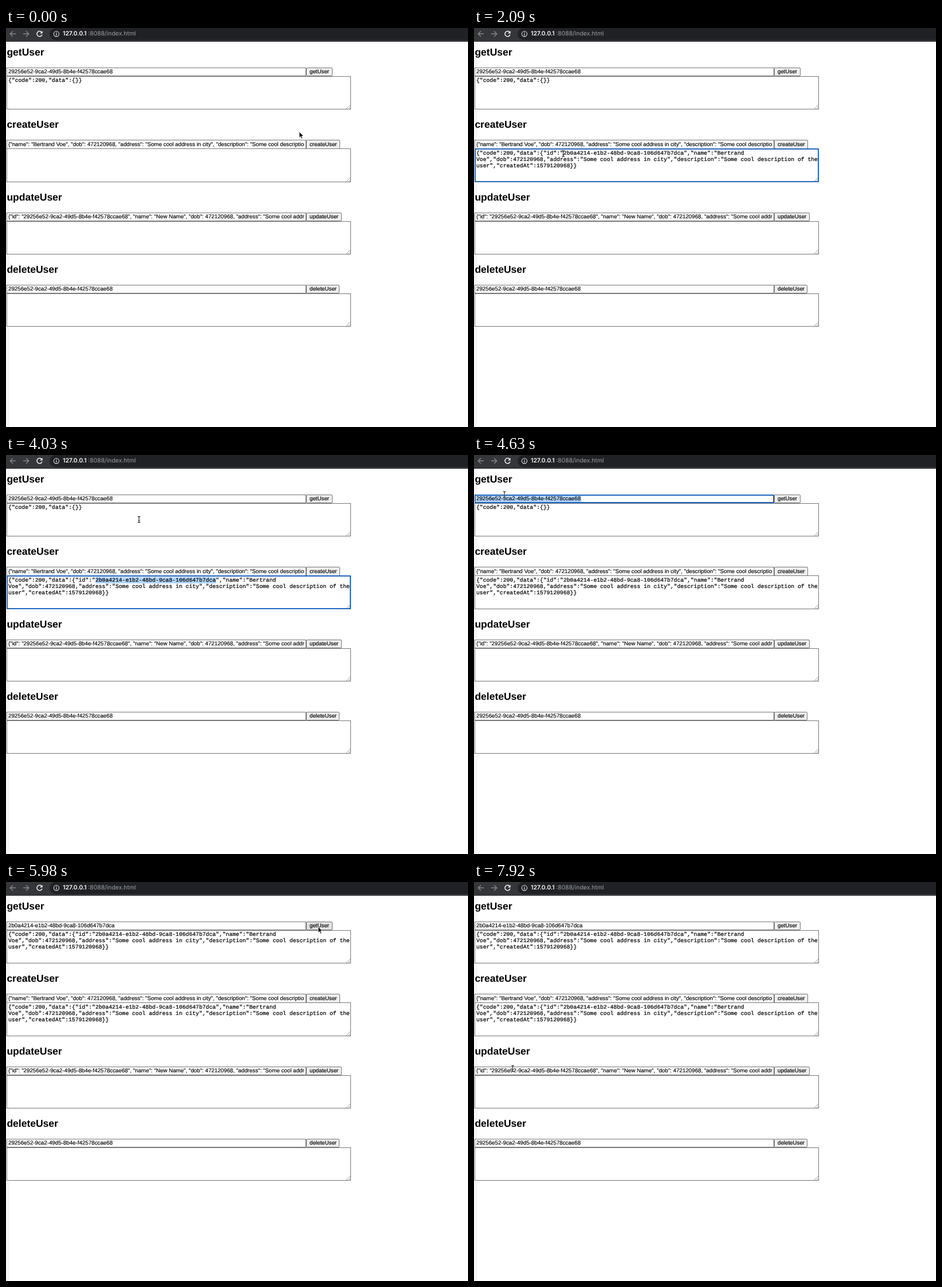
An HTML page for the animation above (8000 ms loop, 805x696 px).

```html
<!DOCTYPE html>
<html lang="en">
<head>
<meta charset="utf-8">
<title>User API</title>
<style>
  html, body { margin: 0; width: 100%; height: 100%; overflow: hidden; background: #fff; }
  body { position: relative; color: #000; text-rendering: geometricPrecision; }
  body *, .page::before, .area::after { position: absolute; box-sizing: border-box; margin: 0; white-space: pre; }

  /* browser bar */
  .bar { left: 0; top: 0; width: 100%; height: 24px; background: #35363a; overflow: hidden; }
  .omni { left: 76px; top: 0; width: 760px; height: 20.5px; border-radius: 10.5px; background: #202124; }
  .bar svg { left: 0; top: 0; }
  .url { top: 2px; font: 10.4px/16px Inter, Roboto, sans-serif; color: #9aa0a6; }
  .host { color: #fff; font-weight: 600; }

  /* form */
  .page { left: 0; top: 0; width: 805px; height: 696px; }
  .page::before { content: ""; left: 0; top: 24px; width: 6px; bottom: 0; background: #f6f6f6; }
  section { left: 0; top: calc(var(--i) * 126.4px); width: 805px; height: 150px; }
  h2 { left: 1.4px; top: 32px; font: bold 17.5px/20px "Liberation Sans", Arial, sans-serif; }
  .field, .btn, .area { border: 1px solid #767676; background: #fff; }
  .field { left: 1px; top: 69px; width: 522px; height: 15.2px; }
  .btn { left: 523px; top: 69px; width: var(--w); height: 15.2px; border-radius: 2px; background: #efefef; }
  .area { left: 1px; top: 84px; width: 600px; height: 58.2px; }
  .area:not(.ring)::after {
    content: ""; right: 0; bottom: 0; width: 7px; height: 7px;
    background: linear-gradient(135deg, #0000 48%, #999 48% 56%, #0000 56% 74%, #999 74% 82%, #0000 82%);
  }
  .line, .label {
    top: 69.2px; font: 9.74px/15px "Liberation Sans", Arial, sans-serif;
    -webkit-text-stroke: .15px #000;
  }
  .line { left: 4px; width: 516px; height: 15px; overflow: hidden; }
  .label { left: 529px; }
  .json {
    left: 4px; top: 87.3px; font: 9.73px/10.95px "Liberation Mono", "Courier New", monospace;
    -webkit-text-stroke: .22px #000;
  }

  /* timeline: 8 s, 1% = 80 ms */
  .anim { animation: 8s step-end infinite; }
  .created { animation-name: created; }
  @keyframes created { 0% { visibility: hidden } 11.125%, 100% { visibility: visible } }
  .empty { animation-name: empty; }
  @keyframes empty { 0% { visibility: visible } 72.875%, 100% { visibility: hidden } }
  .found { animation-name: found; }
  @keyframes found { 0% { visibility: hidden } 72.875%, 100% { visibility: visible } }
  .old-id { animation-name: old-id; }
  @keyframes old-id { 0% { visibility: visible } 61.625%, 100% { visibility: hidden } }
  .new-id { animation-name: new-id; }
  @keyframes new-id { 0% { visibility: hidden } 61.625%, 100% { visibility: visible } }

  .hover-create { animation-name: hover-create; }
  @keyframes hover-create { 0%, 13% { background: #efefef } 3.667% { background: #e2e2e2 } }
  .hover-get { animation-name: hover-get; }
  @keyframes hover-get { 0%, 78.5% { background: #efefef } 71% { background: #e2e2e2 } }

  .ring { border: 2px solid #1f66c1; border-radius: 2px; background: none; }
  .ring-area { animation-name: ring-area; }
  @keyframes ring-area { 0%, 52.25% { visibility: hidden } 24.25% { visibility: visible } }
  .ring-field { animation-name: ring-field; }
  @keyframes ring-field { 0%, 71% { visibility: hidden } 52.25% { visibility: visible } }

  .pick { background: #b3d5fd; }
  .pick-json { left: 155.8px; top: 86.8px; width: 0; height: 11px; animation-name: pick-json; }
  @keyframes pick-json {
    0% { width: 0 }
    26.125% { width: 0; animation-timing-function: steps(5) }
    35.5% { width: 181px }
    37.375% { width: 193px }
    39.25% { width: 204.4px }
    41.125% { width: 210.2px }
    52.25%, 100% { width: 0 }
  }
  .pick-id { left: 4px; top: 71px; width: 182.5px; height: 11px; transform-origin: right; animation-name: pick-id; }
  @keyframes pick-id {
    0% { transform: scaleX(0) }
    54.125% { transform: scaleX(.24) }
    56% { transform: scaleX(.49) }
    57.875% { transform: scaleX(1) }
    61.625%, 100% { transform: scaleX(0) }
  }

  /* pointer */
  .pointer { left: 0; top: 0; animation-name: move; }
  .pointer svg { left: -10px; top: -10px; }
  @keyframes move {
    0% { transform: translate(511px, 181px); animation-timing-function: steps(3) }
    5.5% { transform: translate(552px, 203px) }
    11.125% { transform: translate(552px, 203px); animation-timing-function: steps(3) }
    16.75% { transform: translate(390px, 213px); animation-timing-function: steps(3) }
    22.375% { transform: translate(170px, 220px) }
    24.25% { transform: translate(156px, 219px) }
    26.125% { transform: translate(155.5px, 219px); animation-timing-function: steps(5) }
    35.5% { transform: translate(340px, 219px) }
    37.375% { transform: translate(351px, 219px) }
    39.25% { transform: translate(361px, 219px) }
    41.125% { transform: translate(363px, 219px) }
    44.75% { transform: translate(363px, 219px); animation-timing-function: steps(4) }
    52.25% { transform: translate(188px, 77px); animation-timing-function: steps(3) }
    57.875% { transform: translate(53px, 69px) }
    61.625% { transform: translate(53px, 69px); animation-timing-function: steps(5) }
    71% { transform: translate(544px, 78px) }
    76.625% { transform: translate(544px, 78px); animation-timing-function: steps(3) }
    82.25% { transform: translate(390px, 120px); animation-timing-function: steps(4) }
    89.75% { transform: translate(188px, 154px) }
    91.625% { transform: translate(186.5px, 148.5px); animation-timing-function: steps(4) }
    99%, 99.99% { transform: translate(67.5px, 325.5px) }
    100% { transform: translate(511px, 181px) }
  }
  .arrow { animation-name: arrow; }
  @keyframes arrow { 0%, 71% { visibility: visible } 13%, 78.5%, 100% { visibility: hidden } }
  .beam { animation-name: beam; }
  @keyframes beam { 0%, 71% { visibility: hidden } 13%, 78.5%, 100% { visibility: visible } }
</style>
</head>
<body>
<main class="page">
  <section style="--i:0; --w:46px">
    <h2>getUser</h2>
    <div class="field"></div>
    <div class="anim pick pick-id"></div>
    <div class="line anim old-id">29256e52-9ca2-49d5-8b4e-f42578ccae68</div>
    <div class="line anim new-id">2b0a4214-e1b2-48bd-9ca8-106d647b7dca</div>
    <div class="field ring anim ring-field"></div>
    <div class="btn anim hover-get"></div><div class="label">getUser</div>
    <div class="area"></div>
    <pre class="json anim empty">{"code":200,"data":{}}</pre>
    <pre class="json anim found">{"code":200,"data":{"id":"2b0a4214-e1b2-48bd-9ca8-106d647b7dca","name":"Bertrand
Voe","dob":472120968,"address":"Some cool address in city","description":"Some cool description of the
user","createdAt":1579120968}}</pre>
  </section>

  <section style="--i:1; --w:59px">
    <h2>createUser</h2>
    <div class="field"></div>
    <div class="line">{"name": "Bertrand Voe", "dob": 472120968, "address": "Some cool address in city", "description": "Some cool description of the user"}</div>
    <div class="btn anim hover-create"></div><div class="label">createUser</div>
    <div class="area"></div>
    <div class="anim pick pick-json"></div>
    <pre class="json anim created">{"code":200,"data":{"id":"2b0a4214-e1b2-48bd-9ca8-106d647b7dca","name":"Bertrand
Voe","dob":472120968,"address":"Some cool address in city","description":"Some cool description of the
user","createdAt":1579120968}}</pre>
    <div class="area ring anim ring-area"></div>
  </section>

  <section style="--i:2; --w:62px">
    <h2>updateUser</h2>
    <div class="field"></div>
    <div class="line">{"id": "29256e52-9ca2-49d5-8b4e-f42578ccae68", "name": "New Name", "dob": 472120968, "address": "Some cool address in city"}</div>
    <div class="btn"></div><div class="label">updateUser</div>
    <div class="area"></div>
  </section>

  <section style="--i:3; --w:58px">
    <h2>deleteUser</h2>
    <div class="field"></div>
    <div class="line">29256e52-9ca2-49d5-8b4e-f42578ccae68</div>
    <div class="btn"></div><div class="label">deleteUser</div>
    <div class="area"></div>
  </section>
</main>

<header class="bar">
  <div class="omni"></div>
  <svg width="100" height="24" fill="none" stroke-width="1.4">
    <path d="M17 10.3H7.5M12 5.5L7.2 10.3L12 15.1M30 10.3H39.5M35 5.5L39.8 10.3L35 15.1" stroke="#85878b"/>
    <path d="M62.2 7.4A4.6 4.6 0 1 0 62.9 11.6" stroke="#f1f3f4" stroke-width="1.5"/>
    <path d="M63.6 5V9.6H59Z" fill="#f1f3f4"/>
    <circle cx="87.8" cy="10.3" r="4.6" stroke="#e8eaed" stroke-width="1.1"/>
    <path d="M87.8 9.6V12.9M87.8 7.5V8.7" stroke="#e8eaed" stroke-width="1.2"/>
  </svg>
  <span class="url host" style="left:99px">127.0.0.1</span>
  <span class="url" style="left:143px">:8088/index.html</span>
</header>

<div class="anim pointer">
  <svg class="anim arrow" width="30" height="30" viewBox="-10 -10 30 30">
    <path d="M0 0V10.4L2.4 8.2L4.1 12.2L5.9 11.4L4.2 7.5H7.4Z" fill="#000" stroke="#fff" stroke-width=".8"/>
  </svg>
  <svg class="anim beam" width="20" height="20" viewBox="-10 -10 20 20" fill="none">
    <defs>
      <path id="bar" d="M-2.4 -5.3Q0 -5.3 0 -4V4Q0 5.3 -2.4 5.3M2.4 -5.3Q0 -5.3 0 -4V4Q0 5.3 2.4 5.3M-1.2 1.8H1.2"/>
    </defs>
    <use href="#bar" stroke="#fff" stroke-width="2"/>
    <use href="#bar" stroke="#111" stroke-width="1.05"/>
  </svg>
</div>
</body>
</html>
```
